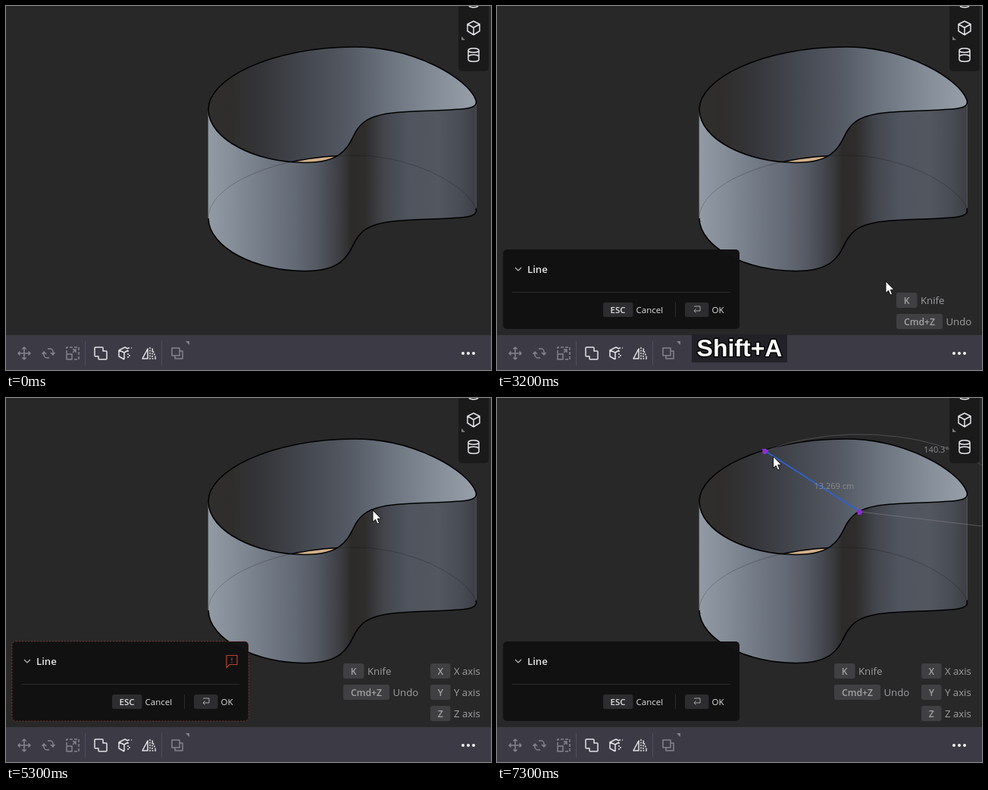
An HTML page for the animation above (8000 ms loop, 640x480 px).

```html
<!DOCTYPE html>
<html lang="en">
<head>
<meta charset="utf-8">
<title>Line tool</title>
<style>
  html, body { margin: 0; height: 100%; overflow: hidden; background: #282829; }
  svg { display: block; width: 640px; height: 480px; font: 13.2px "Open Sans", "Noto Sans", sans-serif; }
  .bold { font-weight: 600; }
  .icon { fill: none; stroke: #e4e4e8; stroke-width: 1.5; stroke-linejoin: round; }
  .dim { stroke: #85848d; }
  .key rect { fill: #404043; }
  .key text { fill: #a2a2a4; font-weight: 600; font-size: 12.2px; text-anchor: middle; }
  .hint { fill: #a0a0a2; }
  .small { font-size: 11.5px; fill: #e2e2e2; }
  .measure { font-size: 11px; fill: #8c8c90; }
  #shortcut text { font: bold 32px "Liberation Sans", Arial, sans-serif; fill: #fff; text-anchor: middle;
    stroke: #000; stroke-width: 3px; paint-order: stroke; stroke-linejoin: round; }
</style>
</head>
<body>
<svg viewBox="0 0 640 480">
  <defs>
    <linearGradient id="inside" gradientUnits="userSpaceOnUse" x1="267" x2="620" y1="0" y2="0"></linearGradient>
    <linearGradient id="outside" gradientUnits="userSpaceOnUse" x1="267" x2="620" y1="0" y2="0"></linearGradient>
    <clipPath id="opening"><path data-d="loop"/></clipPath>
  </defs>
  <rect width="640" height="480" fill="#282829"/>

  <!-- solid -->
  <path data-d="wall" fill="url(#outside)"/>
  <path data-d="loop" fill="url(#inside)"/>
  <g clip-path="url(#opening)">
    <path data-d="loop" transform="translate(0 143)" fill="#d3b08a" stroke="#000" stroke-width="1.4"/>
  </g>
  <path data-d="back" transform="translate(0 143)" fill="none" stroke="#000" stroke-opacity=".22"/>
  <path d="M267 137V280" stroke="#8b9199" stroke-opacity=".7"/>
  <path d="M620.3 126V266" stroke="#606369" stroke-opacity=".8"/>
  <path data-d="front" transform="translate(0 143)" fill="none" stroke="#000" stroke-width="1.6"/>
  <path data-d="loop" id="rim" fill="none"/>

  <!-- line being drawn -->
  <g id="drawing">
    <path id="arc" fill="none" stroke="#77777b" stroke-opacity=".5"/>
    <path d="M479 150L640 169" stroke="#8a8a8e" stroke-opacity=".5"/>
    <path id="line" stroke="#2c62d4" stroke-width="1.7"/>
    <path d="M475 147h5l3 3-3 4h-4z" fill="#8a2ed6"/>
    <path id="endDot" d="M350 67h5l3 3-3 4h-4z" fill="#8a2ed6"/>
    <text id="len" class="measure"></text>
    <text id="angle" class="measure" text-anchor="middle"></text>
  </g>

  <!-- side palette -->
  <path d="M597 0H637V81a5 5 0 0 1-5 5H602a5 5 0 0 1-5-5Z" fill="#1a1a1b"/>
  <g class="icon">
    <path d="M611 0a6.5 3 0 0 0 12 0"/>
    <path d="M617 20l8 4v9l-8 5-8-5v-9zM609 24l8 4.500 8-4.500M617 28.500V38"/>
    <path d="M610 58.500a7 2.800 0 0 1 14 0v12a7 2.800 0 0 1-14 0zM610 58.500a7 2.800 0 0 0 14 0M610 67a7 2.800 0 0 1 14 0"/>
  </g>
  <path d="M601 40v5h5z" fill="#77777a"/>

  <!-- toolbar -->
  <rect y="434" width="640" height="46" fill="#3c3a44"/>
  <g class="icon dim">
    <path transform="translate(24 458)" d="M-8 0H8M0-8V8M-5.500-2.500L-8 0l2.500 2.500M5.500-2.500L8 0 5.500 2.500M-2.500-5.500L0-8l2.500 2.500M-2.500 5.500L0 8l2.500-2.500"/>
    <path transform="translate(56 458)" d="M-1-6H2a4 4 0 0 1 4 4V1M3-1L6 2 8.500-1M1 6H-2a4 4 0 0 1-4-4V-1M-3 1L-6-2-8.500 1"/>
    <path transform="translate(88 458)" d="M-8 0V-8H8V8H0" stroke-dasharray="4 2"/>
    <path transform="translate(88 458)" d="M-8 1H-1V8H-8ZM0-1L4-5M0-5H4V-1"/>
    <path transform="translate(226 458)" d="M-7-7H3V3H-7ZM-3 3V7H7V-3H3"/>
  </g>
  <g class="icon">
    <path transform="translate(125 458)" d="M-7-8H2q1 0 1 1V-3H7q1 0 1 1V7q0 1-1 1H-2q-1 0-1-1V4H-7q-1 0-1-1V-7q0-1 1-1Z"/>
    <path transform="translate(157 458)" d="M-1 8L-8 4V-4L0-8 4-6M-8-4L-1-1V8M-1-1L4-4"/>
    <path transform="translate(157 458)" d="M4-7H9M4-4V7M5 3H9" stroke-dasharray="2 2"/>
    <path transform="translate(189 458)" d="M-2-6V7H-9Z"/>
    <path transform="translate(189 458)" d="M1-8V8M4-6L9 7H4Z" stroke-dasharray="2 1.500"/>
  </g>
  <path d="M104.500 442V474M205.500 442V474" stroke="#504e59"/>
  <path d="M237 442h5v5z" fill="#85848d"/>
  <g fill="#f0f0f2"><circle cx="603" cy="458" r="2"/><circle cx="610" cy="458" r="2"/><circle cx="617" cy="458" r="2"/></g>

  <!-- dialog -->
  <g id="dialog">
    <rect x="8" y="321" width="312" height="105" rx="5" fill="#111112" fill-opacity=".98"/>
    <path d="M24 345l4 4 4-4" fill="none" stroke="#bbb" stroke-width="1.2"/>
    <text x="40" y="352" class="bold" fill="#e6e6e6">Line</text>
    <path d="M20 377.500H308M235.500 391V410" stroke="#2c2c2e"/>
    <rect x="140" y="391" width="39.500" height="19" rx="3" fill="#2d2d2f"/>
    <rect x="248" y="391" width="31.500" height="19" rx="3" fill="#2d2d2f"/>
    <text x="149.500" y="405" class="small bold">ESC</text>
    <text x="183.500" y="405" class="small">Cancel</text>
    <path d="M260 396h8v6h-8M262.500 399.500L260 402l2.500 2.500" fill="none" stroke="#a8a8aa"/>
    <text x="283.500" y="405" class="small">OK</text>
    <g id="alert" fill="none" stroke="#b5432c">
      <rect x="8" y="321" width="312" height="105" rx="5" stroke-opacity=".6" stroke-dasharray="2 2"/>
      <path d="M291 339.500h14v12h-10l-4 4zM298 342.500v4M298 348v1.500" stroke-width="1.200"/>
    </g>
  </g>
  <g id="hints"></g>
  <g id="axisHints"></g>

  <g id="shortcut">
    <rect y="433" height="37" fill="#222127"/>
    <text x="320" y="462"></text>
  </g>

  <!-- snapping and pointer -->
  <g id="snap">
    <g id="ring"><ellipse ry="10" fill="none" stroke="#0c0c10" stroke-width="2"/><circle r="1.800" fill="#0c0c10"/></g>
    <g id="tag">
      <rect height="23.500" rx="3" fill="#68696f"/>
      <text x="8" y="16" class="small bold" fill="#fff"></text>
    </g>
  </g>
  <path id="cursor" d="M0 0V15.500L3.500 12.200 6 18 8.600 17 6.200 11.200H11Z" fill="#fff" stroke="#000" stroke-width=".9"/>
</svg>
<script>
const $ = id => document.getElementById(id);
const set = (el, attrs) => { for (const k in attrs) el.setAttribute(k, attrs[k]); };
const show = (id, on) => { $(id).style.display = on ? '' : 'none'; };
const move = (id, x, y) => set($(id), { transform: `translate(${x} ${y})` });

// Outline of the solid: rear half left to right, front half right to left.
const rear = 'C266 96 350 54 460 54C540 54 610 96 620 124';
const fore = 'C623 133 612 135 600 136C560 139 530 138 502 142C480 146 470 152 462 165'
  + 'C452 182 448 206.5 395 206.5C330 207 268 176 267 137';
const foreDown = 'C268 319 330 350 395 349.5C448 349.5 452 325 462 308'
  + 'C470 295 480 289 502 285C530 281 560 282 600 279C612 278 623 276 620 267';
const shapes = {
  loop: 'M267 137' + rear + fore + 'Z',
  back: 'M267 137' + rear,
  front: 'M620 124' + fore,
  wall: 'M620 124' + fore + 'V280' + foreDown + 'Z',
};
document.querySelectorAll('[data-d]').forEach(p => set(p, { d: shapes[p.dataset.d] }));

function shade(id, stops) {
  $(id).innerHTML = stops.map(([x, c]) => `<stop offset="${(x - 267) / 353}" stop-color="#${c}"/>`).join('');
}
shade('inside', [[267, '302f2d'], [295, '2e2d2b'], [340, '35363a'], [400, '454951'],
  [450, '535862'], [500, '69717c'], [560, '828a95'], [620, '979fa9']]);
shade('outside', [[267, '929ba5'], [300, '858d98'], [340, '737b86'], [380, '646a76'], [410, '545963'],
  [440, '3c3e43'], [456, '2c2b29'], [474, '2e2d2c'], [500, '43464d'], [530, '4f545e'],
  [570, '53575f'], [600, '484c54'], [620, '3c3f45']]);

const hint = (x, y, w, key, label) =>
  `<g class="key"><rect x="${x}" y="${y}" width="${w}" height="20" rx="3"/>` +
  `<text x="${x + w / 2}" y="${y + 14.5}">${key}</text></g>` +
  `<text class="hint" x="${x + w + 4.5}" y="${y + 15}">${label}</text>`;
$('hints').innerHTML = hint(527, 378, 27.5, 'K', 'Knife') + hint(527, 406, 61, 'Cmd+Z', 'Undo');
$('axisHints').innerHTML = hint(445, 350, 27.5, 'K', 'Knife') + hint(445, 378, 61, 'Cmd+Z', 'Undo')
  + [...'XYZ'].map((a, i) => hint(560, 350 + 28 * i, 26.5, a, a + ' axis')).join('');

// Rows are [time, ...values]
const pointer = [[800, 513, 462], [900, 513, 420], [1000, 513, 388], [1100, 513, 374], [3100, 513, 374],
  [3200, 513, 363], [3400, 510, 318], [3700, 494, 222], [4000, 480, 160], [4100, 479, 157],
  [4600, 484, 148], [5300, 484, 148], [5400, 476, 141], [5700, 430, 108], [6100, 372, 82],
  [6300, 366, 77], [6500, 364.5, 77]];
// Snap point: x, y, ring radius, length
const snaps = [[4100, 462, 165, 10.5, 0], [4600, 479, 150, 8, 0], [5300, 479, 150, 8, 0],
  [6200, 370, 66.5, 5, 13.23], [6300, 367, 67, 5, 13.237], [6500, 354, 70, 5, 13.269]];

function at(rows, t) {
  const i = rows.findIndex(r => r[0] > t);
  if (i < 0) return rows[rows.length - 1].slice(1);
  if (!i) return rows[0].slice(1);
  const [a, b] = [rows[i - 1], rows[i]], k = (t - a[0]) / (b[0] - a[0]);
  return a.slice(1).map((v, j) => v + (b[j + 1] - v) * k);
}

// The top plane appears as an ellipse around the first point.
const CX = 479, CY = 150, RX = 195, RY = 99, BASE = 11.83;

function drawLine(x, y, len) {
  const u = (x - CX) / RX, v = (CY - y) / RY, n = Math.hypot(u, v);
  const deg = Math.atan2(v, u) * 180 / Math.PI;
  const point = d => {
    const a = d * Math.PI / 180;
    return [CX + RX * n * Math.cos(a), CY - RY * n * Math.sin(a)];
  };
  const [mx, my] = point((deg - BASE) / 2);
  set($('line'), { d: `M${CX} ${CY}L${x} ${y}` });
  set($('arc'), { d: `M${x} ${y}A${RX * n} ${RY * n} 0 0 1 ${point(-BASE)}` });
  set($('len'), { x: (x + CX) / 2 + 2, y: (y + CY) / 2 + 9.5 });
  set($('angle'), { x: mx - 5, y: my + 9 });
  $('len').textContent = (len || 13.03 * n).toFixed(3) + ' cm';
  $('angle').textContent = (deg + BASE).toFixed(1) + '°';
}

function render(t) {
  const within = (a, b) => t >= a && t < b;
  const [px, py] = at(pointer, t), [sx, sy, r, len] = at(snaps, t);
  const hover = within(4100, 5300) || within(6200, 7100);

  show('cursor', t >= 800);
  move('cursor', px, py);
  set($('rim'), { stroke: hover ? '#f2f2f2' : '#000', 'stroke-width': hover ? 2 : 1.6 });

  show('shortcut', within(2000, 3600));
  const wide = t >= 2500;
  set($('shortcut').children[0], wide ? { x: 257, width: 126 } : { x: 278, width: 84 });
  $('shortcut').children[1].textContent = wide ? 'Shift+A' : 'Shift';

  show('dialog', t >= 2600);
  show('hints', within(2600, 5300));
  show('axisHints', t >= 5300);
  show('alert', within(5300, 5700));
  set($('alert'), { opacity: 1 - Math.max(0, t - 5300) / 400 });

  show('snap', hover);
  move('ring', sx, sy);
  set($('ring').children[0], { rx: r, transform: 'rotate(-8)' });
  move('tag', sx + 20.5, sy - 19);
  const middle = t < 4300;
  set($('tag').children[0], { width: middle ? 53 : 42 });
  $('tag').children[1].textContent = middle ? 'Middle' : 'Edge';

  show('drawing', t >= 5400);
  show('endDot', t >= 7100);
  if (t >= 6200) drawLine(sx, sy, len);
  else if (t >= 5400) drawLine(px, py);
}

function tick() {
  render(Math.floor(performance.now() % 8000 / 100) * 100);
  requestAnimationFrame(tick);
}
tick();
</script>
</body>
</html>
```
